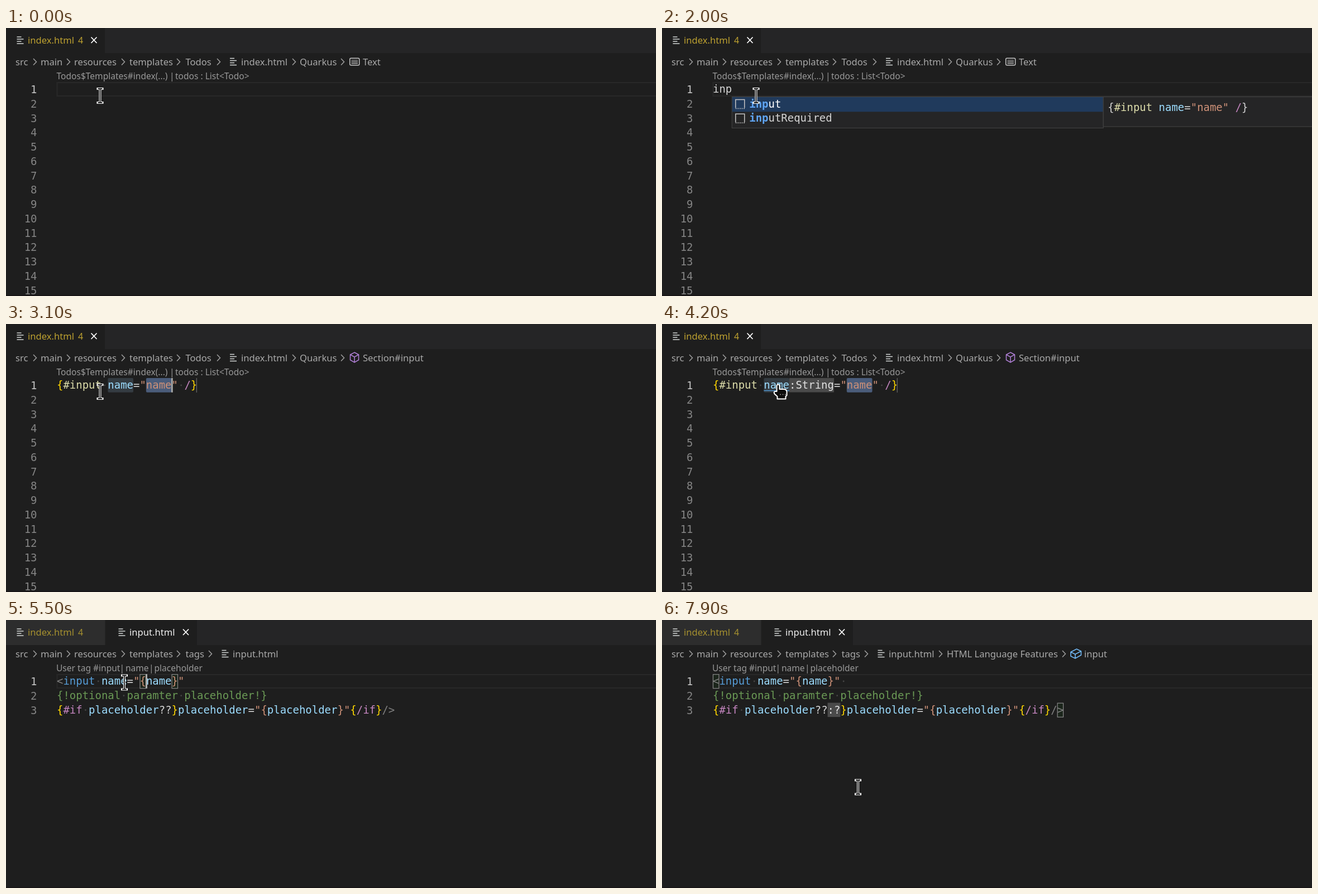
Animation, 1164 px wide and 481 px high, one loop 8000 ms. Source, as an HTML page:

```html
<!DOCTYPE html>
<html lang="en">
<head>
<meta charset="utf-8">
<title>Editor: user tag completion</title>
<style>
  html, body { margin: 0; width: 100%; height: 100%; overflow: hidden; background: #1e1e1e; }
  svg { display: block; width: 100%; height: 100%; }
  text { white-space: pre; }
  .ui { font-family: "Noto Sans", sans-serif; }
  .mono { font: 18.97px "DejaVu Sans Mono", monospace; }
  .bold { font-weight: 700; }
  .line { fill: none; }
</style>
</head>
<body>
<svg id="stage" viewBox="0 0 1164 481" preserveAspectRatio="none"></svg>
<script>
const LOOP = 8000, LEFT = 91, CHAR = 11.42, ROW = 25.77, TOP = 97;
const color = {
  text: '#d4d4d4', brace: '#ffd700', tag: '#dcdcaa', attr: '#9cdcfe', str: '#ce9178',
  key: '#c586c0', punct: '#808080', elem: '#569cd6', note: '#6a9955', hint: '#e2e2e2'
};

// Each step overrides the state left by the one before it.
const steps = [
  [0, { file: 'index', typed: '', caret: null, mouse: ['beam', 168.5, 121.5], symbol: 'Text' }],
  [600, { caret: 0 }],
  [1000, { typed: 'in', caret: 2, menu: ['include', 'input', 'inputRequired', 'insert'] }],
  [1500, { typed: 'inp', caret: 3, menu: ['input', 'inputRequired'] }],
  [2000, { caret: null }],
  [2200, { menu: null, snippet: true, selected: true, caret: 18 }],
  [2300, { same: true }],
  [3100, { symbol: 'Section#input' }],
  [3300, { mouse: ['beam', 180, 116] }],
  [3500, { hint: true, caret: 25, mouse: ['beam', 201, 112] }],
  [4000, { mouse: ['beam', 204, 112] }],
  [4200, { mouse: ['hand', 208, 107], caret: null, link: 12 }],
  [4600, { caret: 25, link: 26 }],
  [4800, { hover: true }],
  [5200, { hover: false, link: 0, same: false, selected: false, caret: 10, pair: [[0, 0], [0, 28]] }],
  [5300, { file: 'input', hint: false, symbol: '', shift: -21, caret: 14,
           pair: [[0, 13], [0, 18]], mouse: ['beam', 212, 112] }],
  [5500, { shift: 0 }],
  [5700, { mouse: ['beam', 270, 112] }],
  [5800, { hint: true, mouse: ['beam', 310, 112] }],
  [6100, { symbol: 'input', mouse: ['beam', 333.5, 112] }],
  [6400, { caret: null }],
  [6600, { caret: 20, pair: [[0, 0], [2, 54]] }],
  [6700, { mouse: ['beam', 351, 220] }],
  [6900, { mouse: ['beam', 351, 297] }],
  [7100, { mouse: ['beam', 351, 300], caret: null }],
  [7500, { caret: 21, space: true }],
  [7900, { caret: null }]
];
const states = [];
steps.reduce((old, [, change]) => {
  const next = { ...old, ...change };
  states.push(next);
  return next;
}, { shift: 0 });

const esc = s => s.replace(/&/g, '&amp;').replace(/</g, '&lt;');
const rect = (x, y, w, h, fill, more = '') =>
  `<rect x="${x}" y="${y}" width="${w}" height="${h}" fill="${fill}" ${more}/>`;
const path = (d, stroke, width = 1.5, more = '') =>
  `<path class="line" d="${d}" stroke="${stroke}" stroke-width="${width}" ${more}/>`;
const ui = (s, x, y, fill = '#a9a9a9', size = 16.6) =>
  `<text class="ui" x="${x}" y="${y}" fill="${fill}" font-size="${size}">${esc(s)}</text>`;
const mono = (s, x, y, fill = color.text, more = '', kind = '') =>
  `<text class="mono ${kind}" x="${x}" y="${y}" fill="${fill}" ${more}>${esc(s)}</text>`;
const colX = n => LEFT + n * CHAR;
const panel = (x, y, w, h) => rect(x + .5, y + .5, w, h, '#252526', 'stroke="#454545"');

// Runs are [text, colour name]; spaces become faint dots when asked for.
function code(runs, x, y, dots) {
  let col = 0, out = '';
  for (const [s, kind] of runs) {
    const left = x + col * CHAR;
    if (kind === 'hint') out += rect(left, y - 19, s.length * CHAR, 25.5, '#4a4a4a');
    out += mono(s, left, y, color[kind]);
    if (dots) [...s].forEach((c, i) => {
      if (c === ' ') out += `<circle cx="${left + (i + .5) * CHAR}" cy="${y - 6}" r="1.4" fill="#464646"/>`;
    });
    col += s.length;
  }
  return out;
}

const inputCall = (brace, hint) => [
  ['{', brace], ['#input', 'tag'], [' ', 'text'], ['name', 'attr'],
  ...(hint ? [[':String', 'hint']] : []),
  ['=', 'text'], ['"name"', 'str'], [' ', 'text'], ['/', 'key'], ['}', brace]
];
const tagLines = s => [
  [['<', 'punct'], ['input', 'elem'], [' name', 'attr'], ['=', 'text'], ['"{', 'str'],
   ['name', 'attr'], ['}"', 'str'], [s.space ? ' ' : '', 'text']],
  [['{!optional paramter placeholder!}', 'note']],
  [['{', 'brace'], ['#if', 'key'], [' placeholder', 'attr'], ['??', 'text'],
   ...(s.hint ? [[':?', 'hint']] : []),
   ['}', 'brace'], ['placeholder', 'attr'], ['=', 'text'], ['"{', 'str'], ['placeholder', 'attr'],
   ['}"', 'str'], ['{', 'brace'], ['/if', 'key'], ['}', 'brace'], ['/>', 'punct']]
];

const fileIcon = (x, y) =>
  path(`M${x} ${y - 6}h8M${x} ${y - 2}h12M${x} ${y + 2}h8M${x} ${y + 6}h12`, '#d4d7d6', 1.6);
const closeIcon = x => path(`M${x - 5} 16.5l10 10.5m0-10.5l-10 10.5`, '#fff', 1.8);
const chevron = x => path(`M${x - 3} 55l5.5 5.8l-5.5 5.8`, '#a0a0a0', 1.5);

function tabs(isIndex) {
  let out = rect(0, 0, 1164, 45, '#252526') + rect(0, 0, 177, 45, isIndex ? '#1e1e1e' : '#2d2d2d');
  const warn = isIndex ? '#bda130' : '#a5902f';
  out += fileIcon(19.5, 22) + ui('index.html', 39, 28, warn) + ui('4', 129, 28, warn, 16);
  if (isIndex) return out + closeIcon(157.5);
  return out + rect(178, 0, 164, 45, '#1e1e1e') + fileIcon(201.5, 22) +
    ui('input.html', 221, 28, '#f0f0f0') + closeIcon(322);
}

const cube = (x, y, stroke) =>
  path(`M${x} ${y - 9}l7.5 4v9.5l-7.5 4.5l-7.5-4.5v-9.5zM${x - 7.5} ${y - 5}l7.5 4.2l7.5-4.2M${x} ${y - .8}v9.8`, stroke);
const symbolIcon = {
  'Text': () => rect(615.7, 54.2, 17, 12.6, 'none', 'rx="2" stroke="#c5c5c5" stroke-width="1.5"') +
    path('M618.5 58h11.5m-11.5 2.8h11.5m-11.5 2.8h11.5', '#c5c5c5', 1.2),
  'Section#input': () => cube(624, 60, '#b180d7'),
  'input': () => path('M732 57.5l10.5-5.5l8 4v7l-10.5 6l-8-4zM732 57.5l8 4l10.5-5.5M740 61.5v7', '#75beff')
};

function crumbs(s) {
  let out = ui('src', 17, 67) + ui('main', 62, 67) + ui('resources', 122, 67) + ui('templates', 221, 67);
  out += [52, 112, 210, 309].map(chevron).join('');
  if (s.file === 'index') {
    out += ui('Todos', 321.5, 67) + fileIcon(401, 60.5) + ui('index.html', 421, 67) +
      ui('Quarkus', 526, 67) + [381, 516, 603].map(chevron).join('') + ui(s.symbol, 639, 67);
  } else {
    out += ui('tags', 321.5, 67) + chevron(366) + fileIcon(386.5, 60.5) + ui('input.html', 406, 67);
    if (s.symbol) out += ui('HTML Language Features', 510, 67) + [499, 720].map(chevron).join('') + ui('input', 756, 67);
  }
  return out + (s.symbol ? symbolIcon[s.symbol]() : '');
}

function lens(s) {
  if (s.shift) return '';
  const parts = s.file === 'index'
    ? [['Todos$Templates#index(...)', 90.5], ['|', 293], ['todos : List<Todo>', 303]]
    : [['User tag #input', 90], ['|', 203.5], ['name', 214], ['|', 256], ['placeholder', 265.5]];
  return parts.map(([t, x]) => ui(t, x, 92, '#999', 15.55)).join('');
}

function gutter(s) {
  const count = s.file === 'index' ? 15 : 3;
  return Array.from({ length: count }, (_, i) =>
    mono(String(i + 1), 55.5, 117 + i * ROW + s.shift, i ? '#858585' : '#c6c6c6', 'text-anchor="end"')).join('');
}

function menu(s) {
  const x = colX(s.typed.length), n = s.typed.length;
  let out = panel(x - .5, 123, 665, s.menu.length * ROW + 4.5) + rect(x + .5, 124, 664, 26.3, '#203a5c');
  s.menu.forEach((word, i) => {
    const y = 142.5 + i * ROW, ix = x + 6.5;
    out += path(`M${ix} ${y + 1}v-15h16v15`, '#c5c5c5', 1.5) +
      path(`M${ix} ${y + 2}h17`, '#c5c5c5', 1.6, 'stroke-dasharray="1.8 1.8"') +
      mono(word.slice(0, n), x + 31, y, '#5fa4f3', '', 'bold') +
      mono(word.slice(n), x + 31 + n * CHAR, y, i ? color.text : '#fff');
  });
  const dx = x + 665, tx = dx + 8;
  if (n === 3) return out + panel(dx - .5, 123, 400, 53.5) + code(inputCall('text'), tx, 149);
  return out + panel(dx - .5, 123, 400, 181.5) + mono('Include section', tx, 149, '#a0a0a0') +
    code([['{', 'text'], ['#include', 'key'], [' template', 'attr'], ['}', 'text']], tx, 195.5) +
    code([['{', 'text'], ['/include', 'key'], ['}', 'text']], tx, 246.5) +
    ui('See', 786.5, 291.5, '#ccc', 17.6) + ui('Include section', 821, 291.5, '#5b8ff0', 17.6) +
    ui('for more information.', 952, 291.5, '#ccc', 17.6);
}

function hover() {
  return panel(181, 123, 92, 76) + mono('String', 193, 148.5, color.text) +
    path('M182 161.5h91', '#454545', 1) + mono('name', 193, 187, color.attr);
}

function pointer([kind, x, y]) {
  if (kind === 'beam') {
    const d = `M${x - 4} ${y - 12.5}h8M${x} ${y - 12.5}v25M${x - 4} ${y + 12.5}h8`;
    return path(d, '#fff', 4, 'stroke-linecap="square"') + path(d, '#161616', 1.8);
  }
  const outline = `M${x - 2.5} ${y + 3.5}q2.5-4.5 5 0v6.5h8q5 .5 5 5v6l-2 2v4.5h-15v-4.5l-5-4.5q-2-4 1-4.5h3z`;
  return `<path d="${outline}" fill="#0c0c0c" stroke="#fff" stroke-width="2" stroke-linejoin="round"/>` +
    path(`M${x + 3} ${y + 19.5}h2m2.5 0h2m2.5 0h2`, '#888', 1.5);
}

function editor(s) {
  let out = s.selected ? '' : rect(LEFT + .5, TOP + 1 + s.shift, 1100, 24, 'none', 'stroke="#282828" stroke-width="2"');
  const mark = (from, to, fill) => rect(colX(from), TOP, (to - from) * CHAR, 25.7, fill, 'rx="2"');
  const pushed = s.hint ? 7 : 0;
  if (s.file === 'index') {
    if (s.same) out += mark(8, 12, '#343b41');
    if (s.selected) out += mark(14 + pushed, 18 + pushed, '#4a5c7a') +
      rect(colX(22 + pushed) - 1.5, TOP, 1.2, 26, '#6b6b6b');
  }
  for (const [row, col] of s.pair || [])
    out += rect(colX(col) + .5, TOP + .7 + row * ROW + s.shift, CHAR - 1, 25, '#1b251b', 'stroke="#888" stroke-width="1.2"');
  const lines = s.file === 'input' ? tagLines(s)
    : [s.snippet ? inputCall('brace', s.hint) : [[s.typed, 'text']]];
  out += lines.map((runs, i) => code(runs, LEFT, 116 + i * ROW + s.shift, true)).join('');
  if (s.link) out += path(`M${colX(8)} 119.5H${colX(s.link)}`, '#4e94ce', 1.5);
  if (s.caret !== null) out += rect(colX(s.caret) - .5, TOP + s.shift, 2.6, 25.8, '#aeafad');
  return out;
}

const draw = s => rect(0, 0, 1164, 481, '#1e1e1e') + tabs(s.file === 'index') + crumbs(s) + lens(s) +
  gutter(s) + editor(s) + (s.menu ? menu(s) : '') + (s.hover ? hover() : '') +
  pointer(s.mouse) + rect(0, 479, 1164, 2, '#191617');

const stage = document.getElementById('stage');
const start = performance.now();
let shown = -1;
function tick(now) {
  const t = Math.max(0, now - start) % LOOP;
  const index = steps.findLastIndex(([at]) => at <= t);
  if (index !== shown) stage.innerHTML = draw(states[shown = index]);
  requestAnimationFrame(tick);
}
tick(start);
</script>
</body>
</html>
```
